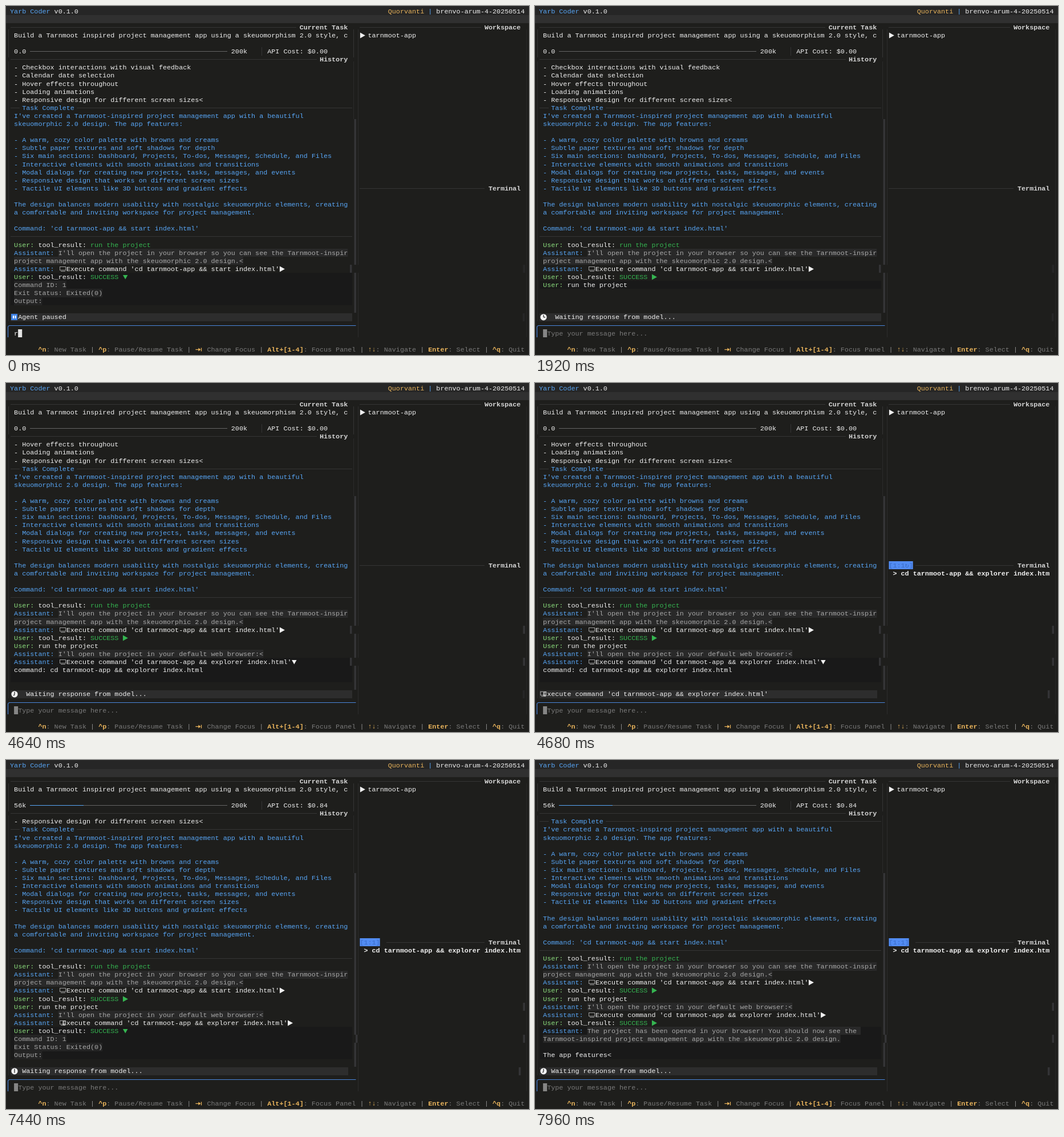
An HTML page with a canvas that plays this animation: 917 by 611 pixels, repeating every 8000 ms.

```html
<!DOCTYPE html>
<html lang="en">
<head>
<meta charset="utf-8">
<title>Terminal coding agent</title>
<style>
  html, body { margin: 0; width: 100%; height: 100%; overflow: hidden; background: #1e1e1c; }
  canvas { display: block; }
</style>
</head>
<body>
<canvas id="stage" width="917" height="611"></canvas>
<script>
const ctx = document.getElementById('stage').getContext('2d');
const LOOP = 8000, CW = 7.05, RH = 14.1;
const FONT = '11.75px "Liberation Mono", "DejaVu Sans Mono", monospace';
const C = {
  bg: '#1e1e1c', line: '#353535', thumb: '#343436', dark: '#191919', status: '#2d2d2d',
  white: '#f0f0f0', title: '#d6d6d6', grey: '#a8a8a8', dim: '#7a7a7a', msg: '#292929',
  blue: '#58a6f6', lime: '#8bdc7d', green: '#35b551', orange: '#e9b45c', icon: '#9c9c9c'
};
const APP = 'tarnmoot-app';
const START = `Execute command 'cd ${APP} && start index.html'`;
const EXPLORE = `Execute command 'cd ${APP} && explorer index.html'`;
const PROMPT = 'run the project';

const midY = row => Math.floor(9.15 + RH * row);
const topY = row => Math.round(1.95 + RH * row);

function box(x, y, w, h, color) {
  ctx.fillStyle = color;
  ctx.fillRect(x, y, w, h);
}

function rowBox(x, row, w, color) {
  box(x, topY(row), w, topY(row + 1) - topY(row), color);
}

const hline = (x1, x2, row, color = C.line) => box(x1, midY(row), x2 - x1, 1, color);
const vline = (x, y1, y2, color = C.line) => box(x, y1, 1, y2 - y1, color);

// Text sits on the character grid
function text(col, row, str, color = C.white, opts = {}) {
  if (opts.bg) rowBox(col * CW, row, str.length * CW, opts.bg);
  ctx.font = (opts.bold ? 'bold ' : '') + FONT;
  ctx.fillStyle = color;
  const y = midY(row) + 4;
  [...str].forEach((ch, i) => { if (ch !== ' ') ctx.fillText(ch, (col + i) * CW, y); });
}

function poly(points, color) {
  ctx.fillStyle = color;
  ctx.beginPath();
  points.forEach(([x, y]) => ctx.lineTo(x, y));
  ctx.fill();
}

function arrow(col, row, open, color = C.white) {
  const x = col * CW + 0.5, y = midY(row) + 0.5;
  poly(open ? [[x, y - 3.5], [x + 8.5, y - 3.5], [x + 4.25, y + 4]]
            : [[x, y - 5], [x + 9, y], [x, y + 5]], color);
}

function monitor(x, row) {
  const y = midY(row);
  ctx.strokeStyle = C.icon;
  ctx.lineWidth = 1;
  ctx.strokeRect(x + 0.5, y - 3.5, 10, 6);
  box(x + 2, y + 4, 8, 1, C.icon);
}

function tabArrow(col, row) {
  const x = col * CW + 1, y = midY(row) + 0.5;
  box(x, y - 0.6, 8, 1.2, C.orange);
  poly([[x + 5, y - 3], [x + 9, y], [x + 5, y + 3]], C.orange);
  box(x + 9.5, y - 3, 1.3, 6, C.orange);
}

function clock(halfHours) {
  const x = 15, y = 544.8;
  ctx.fillStyle = '#f4f4f4';
  ctx.beginPath();
  ctx.arc(x, y, 5.6, 0, 7);
  ctx.fill();
  const hand = (deg, len) => {
    const a = deg * Math.PI / 180;
    ctx.moveTo(x, y);
    ctx.lineTo(x + len * Math.sin(a), y - len * Math.cos(a));
  };
  ctx.strokeStyle = '#2a2a2a';
  ctx.lineWidth = 1.3;
  ctx.beginPath();
  hand(halfHours * 15, 3);
  hand(halfHours % 2 ? 180 : 0, 4);
  ctx.stroke();
}

// History lines: each is a function of the row it lands on
const plain = (str, color = C.white, bg) => row => text(2, row, str, color, { bg });
const blank = () => {};
const rule = label => row => {
  if (!label) return hline(8, 607, row);
  hline(8, 24, row);
  text(4, row, label, C.blue);
  hline(124, 607, row);
};
const user = str => row => {
  text(2, row, 'User:', C.lime);
  text(8, row, str);
};
const result = (str, open) => row => {
  user('tool_result:')(row);
  text(21, row, str, C.green);
  if (open !== undefined) arrow(29, row, open, C.green);
};
const assistant = str => row => {
  text(2, row, 'Assistant:', C.blue);
  text(13, row, str, C.grey, { bg: C.msg });
};
const execute = (str, open, col = 15) => row => {
  text(2, row, 'Assistant:', C.blue);
  monitor(94, row);
  text(col, row, str);
  arrow(col + str.length, row, open);
};
const active = line => row => {
  rowBox(8, row, 599, C.dark);
  line(row);
};

const HEAD = [
  ...['- Checkbox interactions with visual feedback', '- Calendar date selection',
    '- Hover effects throughout', '- Loading animations',
    '- Responsive design for different screen sizes<'].map(s => plain(s)),
  rule('Task Complete'),
  ...["I've created a Tarnmoot-inspired project management app with a beautiful",
    'skeuomorphic 2.0 design. The app features:', '',
    '- A warm, cozy color palette with browns and creams',
    '- Subtle paper textures and soft shadows for depth',
    '- Six main sections: Dashboard, Projects, To-dos, Messages, Schedule, and Files',
    '- Interactive elements with smooth animations and transitions',
    '- Modal dialogs for creating new projects, tasks, messages, and events',
    '- Responsive design that works on different screen sizes',
    '- Tactile UI elements like 3D buttons and gradient effects', '',
    'The design balances modern usability with nostalgic skeuomorphic elements, creating',
    'a comfortable and inviting workspace for project management.', '',
    `Command: 'cd ${APP} && start index.html'`].map(s => plain(s, C.blue)),
  rule(),
  result(PROMPT),
  assistant("I'll open the project in your browser so you can see the Tarnmoot-inspir"),
  plain('project management app with the skeuomorphic 2.0 design.<', C.grey, C.msg),
  execute(START, false)
];

const OUTPUT = [
  result('SUCCESS', true),
  ...['Command ID: 1', 'Exit Status: Exited(0)', 'Output:'].map(s => plain(s, C.grey, '#242424'))
].map(active);

const REPLY = ('The project has been opened in your browser! You should now see the ' +
  'Tarnmoot-inspired project management app with the skeuomorphic 2.0 design. ' +
  'The app features').split(' ');

function reply(count) {
  const part = (a, b) => REPLY.slice(a, Math.min(b, count)).join(' ') + (count > b ? ' ' : '<');
  const lines = [assistant(part(0, 13))];
  if (count > 13) lines.push(plain(part(13, 22).trimEnd(), C.grey, C.msg));
  if (count > 22) lines.push(blank, plain(part(22, 25)));
  return lines.map(active);
}

function tail(t) {
  if (t < 680) return OUTPUT;
  const done = result('SUCCESS', false), ask = user(PROMPT);
  if (t < 4160) return [done, active(ask)];
  const full = "I'll open the project in your default web browser:";
  const said = t < 4240 ? "I'll" : t < 4320 ? "I'll open the project in" : full;
  if (t < 4640) return [done, ask, active(assistant(said + '<'))];
  const past = [done, ask, assistant(full + '<')];
  if (t < 4800) {
    return [...past, ...[execute(EXPLORE, true),
      plain(`command: cd ${APP} && explorer index.html`), blank].map(active)];
  }
  if (t < 7480) return [...past, execute(EXPLORE, false, 14), ...OUTPUT];
  const step = Math.floor((t - 7480) / 60) + 1;
  return [...past, execute(EXPLORE, false), done, ...reply(Math.round(25 * step / 9))];
}

function drawHistory(t) {
  const lines = [...HEAD, ...tail(t)];
  const scroll = Math.max(t < 4800 ? 0 : 4, lines.length - 30);
  lines.slice(scroll).forEach((line, i) => line(7 + i));
}

function drawFrame() {
  box(0, 0, 917, 611, C.bg);
  box(0, 0, 917, 16, '#262626');
  box(0, 16, 917, 14, '#303030');
  text(1, 0, 'Yarb Coder', C.blue);
  text(12, 0, 'v0.1.0');
  text(95, 0, 'Quorvanti', C.orange);
  text(105, 0, '|', C.blue);
  text(107, 0, 'brenvo-arum-4-20250514');

  hline(8, 509, 2);
  hline(8, 545, 6);
  hline(620, 833, 2);
  vline(4, 41, 90);
  vline(609, 41, 90);
  vline(4, 97, 552, '#2b2b2b');
  vline(609, 97, 198, '#2b2b2b');
  vline(617, 41, 580, '#2c2c2c');
  vline(912, 41, 580, '#262626');
  const label = (col, row, str) => text(col, row, str, C.title, { bold: true });
  label(73, 2, 'Current Task');
  label(78, 6, 'History');
  label(119, 2, 'Workspace');
  label(120, 22, 'Terminal');
  text(2, 3, 'Build a Tarnmoot inspired project management app using a skeuomorphism 2.0 style, c');
  arrow(88, 3, false);
  text(90, 3, APP);
}

function drawUsage(t) {
  const used = t >= 7440;
  text(2, 5, used ? '56k' : '0.0');
  hline(42, 388, 5, '#656565');
  if (used) hline(42, 136, 5, C.blue);
  text(56, 5, '200k');
  vline(448, 72, 87);
  text(65, 5, 'API Cost: ' + (used ? '$0.84' : '$0.00'));
}

// Wide icons push the scrollbar aside on their rows
function drawScrollbar(t) {
  box(610.5, 198, 3.5, 339, C.thumb);
  const early = t < 4640, collapsed = t >= 4800;
  const rows = early ? [32] : [30, 34];
  for (const row of rows) rowBox(906.5, row, 3.5, early ? '#262626' : C.thumb);
  for (const row of collapsed ? [34] : rows) {
    rowBox(609.5, row, 8.5, C.bg);
    rowBox(collapsed ? 613 : 603, row, 3.5, C.thumb);
  }
}

function drawTerminal(t) {
  const tag = t < 4680 ? '' : t < 4800 ? '[1:1↻]' : '[1:1]';
  hline(tag ? 667 : 620, 839, 22);
  if (!tag) return;
  text(88, 22, tag, '#3a6cc8', { bg: '#528cf2' });
  text(89, 23, `> cd ${APP} && explorer index.htm`, C.white, { bold: true });
}

function drawStatus(t) {
  const narrow = t >= 4680;
  rowBox(8, 38, narrow ? 592 : 599, C.status);
  rowBox(narrow ? 899 : 906, 38, 3.5, narrow ? C.thumb : '#262626');
  const wait = 'Waiting response from model...';
  if (t < 720) {
    box(9, 539, 11, 11, '#3f83e6');
    box(12, 542, 2, 5, '#fff');
    box(15.5, 542, 2, 5, '#fff');
    text(3, 38, 'Agent paused');
  } else if (t < 4680) {
    clock(Math.floor(t / 320));
    text(5, 38, wait);
  } else if (t < 7440) {
    monitor(9, 38);
    text(2, 38, EXPLORE);
  } else {
    clock(12 + Math.floor((t - 7280) / 320));
    text(4, 38, wait);
  }
}

function drawInput(t) {
  const top = midY(39) + 0.5;
  ctx.strokeStyle = '#4a86dc';
  ctx.lineWidth = 1.2;
  ctx.beginPath();
  ctx.moveTo(3.5, 580);
  ctx.lineTo(3.5, top + 3);
  ctx.quadraticCurveTo(3.5, top, 7, top);
  ctx.lineTo(613.5, top);
  ctx.stroke();
  if (t < 640) {
    const n = 1 + Math.round(14 * Math.min(8, Math.floor(t / 40)) / 8);
    text(2, 40, PROMPT.slice(0, n));
    rowBox((2 + n) * CW, 40, CW, '#e4e4e4');
  } else {
    rowBox(2 * CW, 40, CW, '#858585');
    text(3, 40, 'Type your message here...', C.dim);
  }
}

const KEYS = [['^n', ': New Task'], ['^p', ': Pause/Resume Task'], ['', '   Change Focus'],
  ['Alt+[1-4]', ': Focus Panel'], ['↑↓', ': Navigate'], ['Enter', ': Select'], ['^q', ': Quit']];

function drawKeys() {
  let col = 8;
  KEYS.forEach(([key, what], i) => {
    if (i) text(col - 2, 42, '|', '#8c8c8c');
    if (key) text(col, 42, key, C.orange, { bold: true });
    else tabArrow(col, 42);
    text(col + key.length, 42, what, C.dim);
    col += key.length + what.length + 3;
  });
}

function draw() {
  const t = performance.now() % LOOP;
  drawFrame();
  drawUsage(t);
  drawHistory(t);
  drawScrollbar(t);
  drawTerminal(t);
  drawStatus(t);
  drawInput(t);
  drawKeys();
  requestAnimationFrame(draw);
}
draw();
</script>
</body>
</html>
```
